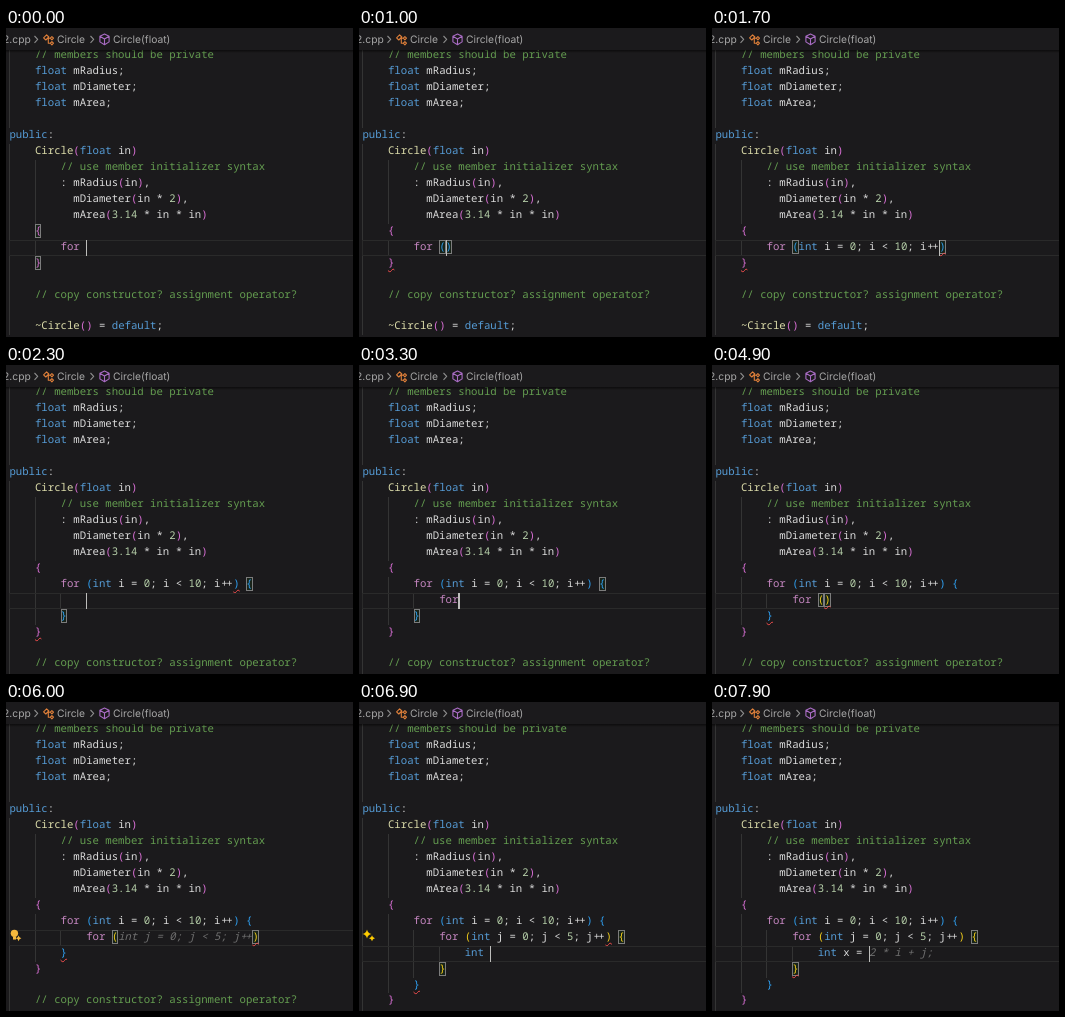
Write an HTML page that moves like this. It is 347 px wide and 309 px high and loops after 8000 ms.

```html
<!DOCTYPE html>
<html lang="en">
<head>
<meta charset="utf-8">
<title>Code editor</title>
<style>
  html, body { margin: 0; width: 100%; height: 100%; overflow: hidden; background: #1b1a1c; }
  #stage { position: relative; width: 347px; height: 309px; overflow: hidden; background: #1b1a1c; color: #dadada; }
  #code { font: 10.67px "Noto Sans Mono", "DejaVu Sans Mono", monospace; text-rendering: geometricPrecision; font-variant-ligatures: none; }
  .line {
    position: absolute; left: 3.4px; width: 346px; height: 15.97px; line-height: 15.97px; white-space: pre;
    background: repeating-linear-gradient(90deg, #343434 0 1px, transparent 1px 25.6px) no-repeat 0 0 / calc(var(--guides) * 25.6px) 100%;
  }
  .current { box-shadow: inset 0 0 0 1px #2a2a2a; }
  .comment { color: #649d50; }
  .type { color: #569cd6; }
  .flow { color: #c586c0; }
  .func { color: #dcdcaa; }
  .num { color: #b5cea8; }
  .ghost { color: #707070; font-style: italic; }
  .depth0 { color: #f0cc1c; }
  .depth1 { color: #da70d6; }
  .depth2 { color: #2f9ff0; }
  .match { box-shadow: inset 0 0 0 1px #7c7c7c; background: rgba(0, 100, 0, .12); }
  .error { text-decoration: underline wavy #f14c4c 1px; text-underline-offset: 2px; text-decoration-skip-ink: none; }
  .plus { letter-spacing: -1.5px; padding: 0 2.25px 0 .75px; }
  .caret { position: absolute; width: 1.2px; height: 15.97px; background: #bdbdbb; }
  #bar { position: absolute; inset: 0 0 auto; height: 22px; background: #1b1a1c; }
  #bar::after { content: ""; position: absolute; inset: 22px 0 auto; height: 3px; background: linear-gradient(rgba(0, 0, 0, .55), transparent); }
  svg { position: absolute; left: 0; top: 0; }
  #bar text { font: 10.3px Inter, Roboto, sans-serif; fill: #a6a6a6; text-rendering: geometricPrecision; }
  .stroke { fill: none; stroke-width: 1.1; stroke-linejoin: round; }
</style>
</head>
<body>
<div id="stage">
  <div id="code"></div>
  <div id="bar">
    <svg width="347" height="22">
      <text x="-3" y="15">2.cpp</text>
      <text x="51" y="15">Circle</text>
      <text x="107" y="15">Circle(float)</text>
      <path class="stroke" stroke="#8c8c8c" d="M28.5 8l3.2 3.4-3.2 3.4M84.5 8l3.2 3.4-3.2 3.4"/>
      <path class="stroke" stroke="#e0803a" d="M37.6 9.8l3-3 2.2 2.2-3 3zM41.5 10.2h3M42.3 10.2v5h2.2M44.3 10.2l1.6-1.6 1.6 1.6-1.6 1.6zM44.3 15.2l1.6-1.6 1.6 1.6-1.6 1.6z"/>
      <path class="stroke" stroke="#a96cc4" d="M98.5 6l4.6 2.3v5.6l-4.6 2.8-4.6-2.8V8.3zM93.9 8.3l4.6 2.6 4.6-2.6M98.5 10.9v5.8"/>
    </svg>
  </div>
  <svg width="347" height="309">
    <path id="spark" fill="#ffcc00" d="M8 211.5q.8 3.7 4.5 4.5-3.7.8-4.5 4.5-.8-3.7-4.5-4.5 3.7-.8 4.5-4.5zM13 217.2q.5 2.5 3 3-2.5.5-3 3-.5-2.5-3-3 2.5-.5 3-3z"/>
    <g id="bulb" fill="#f5b83d">
      <circle cx="8.4" cy="215.4" r="3.7"/>
      <path d="M7 218.4h3v3.2H7z"/>
      <path d="M12.6 217.6q.5 2.3 2.8 2.8-2.3.5-2.8 2.8-.5-2.3-2.8-2.8 2.3-.5 2.8-2.8z"/>
    </g>
  </svg>
</div>
<script>
const LOOP = 8000, TOP = 20, PITCH = 15.97;

const head = `\t// members should be private
\tfloat mRadius;
\tfloat mDiameter;
\tfloat mArea;

public:
\tCircle(float in)
\t\t// use member initializer syntax
\t\t: mRadius(in),
\t\t  mDiameter(in * 2),
\t\t  mArea(3.14 * in * in)
`;
const tail = `

\t// copy constructor? assignment operator?

\t~Circle() = default;`;

// Markup: | caret, « » suggestion, ` error on the next bracket
const ctor = (body, err = '') => `\t{\n${body}\n\t${err}}`;
const loop = (depth, head, body, err = '', endErr = '') => {
  const tabs = '\t'.repeat(depth);
  return `${tabs}for (${head}${err}) {\n${body}\n${tabs}${endErr}}`;
};
const I = 'int i = 0; i < 10; i++', J = 'int j = 0; j < 5; j++';
const first = (line, err, ctorErr) => ctor(loop(2, I, '\t\t\t' + line, err), ctorErr);
const second = (line, endErr = '') => ctor(loop(2, I, '\t\t\t' + line, '', endErr));
const inner = (line, err, endErr, outerErr) =>
  ctor(loop(2, I, loop(3, J, '\t\t\t\t' + line, err, endErr), '', outerErr));

const steps = [
  [0, ctor('\t\tfor |')],
  [800, ctor('\t\tfor (|)')],
  [900, ctor('\t\tfor (|)', '`')],
  [1400, ctor(`\t\tfor (|«${I}»)`, '`')],
  [1700, ctor(`\t\tfor (${I}|\`)`, '`')],
  [1900, ctor(`\t\tfor (${I}\`) {|}`, '`')],
  [2100, first('|', '`', '`')],
  [2800, first('|')],
  [3000, first('f|')],
  [3100, first('fo|')],
  [3200, first('for|')],
  [3400, first('for |')],
  [4300, second('for (|)')],
  [4900, second('for (|`)', '`')],
  [5600, second(`for (|«${J}»\`)`, '`')],
  [6300, second(`for (${J}|\`)`, '`')],
  [6400, second(`for (${J}\`) {|}`, '`')],
  [6500, inner('|', '`', '', '`')],
  [6600, inner('i|', '`', '', '`')],
  [6700, inner('in|', '`', '', '`')],
  [6800, inner('int|', '`', '', '`')],
  [6900, inner('int |', '`', '', '`')],
  [7300, inner('int x|')],
  [7400, inner('int x |')],
  [7500, inner('int x =|', '', '`')],
  [7600, inner('int x = |', '', '`')],
  [7800, inner('int x = |«2 * i + j;»', '', '`')],
];

const icons = [
  [3500, 4300, 'spark', 12],
  [5700, 6300, 'bulb', 13],
  [6800, 7200, 'spark', 13],
];

// Times at which the typed text itself changes; they restart the caret blink
const plain = s => s.replace(/`|«[^»]*»/g, '');
const edits = steps.filter((s, i) => !i || plain(s[1]) !== plain(steps[i - 1][1])).map(s => s[0]);

const code = document.getElementById('code');
const span = (cls, text) => `<span class="${cls}">${text}</span>`;
const escape = s => s.replace(/</g, '&lt;').replace(/\+\+/g, span('plus', '++'));
const TOKEN = /\/\/.*|«[^»]*»|~?Circle|\b(?:float|int|public|default|for)\b|\b\d+(?:\.\d+)?\b|`?[(){}]|\||\+\+|</g;

function render(body) {
  const open = [];
  let count = 0, active = -1;

  const bracket = token => {
    const ch = token.at(-1);
    const opens = '({'.includes(ch);
    if (opens) open.push(count++);
    const depth = open.length % 3;
    const id = opens ? open.at(-1) : open.pop();
    return span(`depth${depth} pair${id}${token.length > 1 ? ' error' : ''}`, ch);
  };
  const paint = token => {
    if (token.startsWith('//')) return span('comment', token);
    if (token[0] === '«') return span('ghost', escape(token.slice(1, -1)));
    if (token === '|') {
      active = open.at(-1);
      return span('caret', '');
    }
    if (/[(){}]/.test(token)) return bracket(token);
    if (token.endsWith('Circle')) return span('func', token);
    if (token === 'for') return span('flow', token);
    if (/^\d/.test(token)) return span('num', token);
    if (/^\w/.test(token)) return span('type', token);
    return escape(token);
  };

  code.innerHTML = (head + body + tail).split('\n').map((raw, row) => {
    const line = raw.replace(/\t/g, '    ');
    const guides = line ? Math.floor(line.search(/[^ ]/) / 4) : 1;
    const cls = line.includes('|') ? 'line current' : 'line';
    return `<div class="${cls}" style="top:${TOP + row * PITCH}px;--guides:${guides}">${line.replace(TOKEN, paint)}</div>`;
  }).join('');
  code.querySelectorAll('.pair' + active).forEach(el => el.classList.add('match'));
}

let shown = null;
const start = performance.now();

function tick() {
  const t = (performance.now() - start) % LOOP;
  const step = steps.findLast(s => s[0] <= t);
  if (step !== shown) render((shown = step)[1]);

  const idle = t - edits.findLast(e => e <= t);
  code.querySelector('.caret').style.opacity = idle % 1000 < 500 ? 1 : 0;

  for (const name of ['spark', 'bulb']) {
    const icon = icons.find(([from, to, kind]) => kind === name && t >= from && t < to);
    const el = document.getElementById(name);
    el.style.display = icon ? '' : 'none';
    if (icon) el.setAttribute('transform', `translate(0 ${(icon[3] - 12) * PITCH})`);
  }
  requestAnimationFrame(tick);
}
tick();
</script>
</body>
</html>
```
